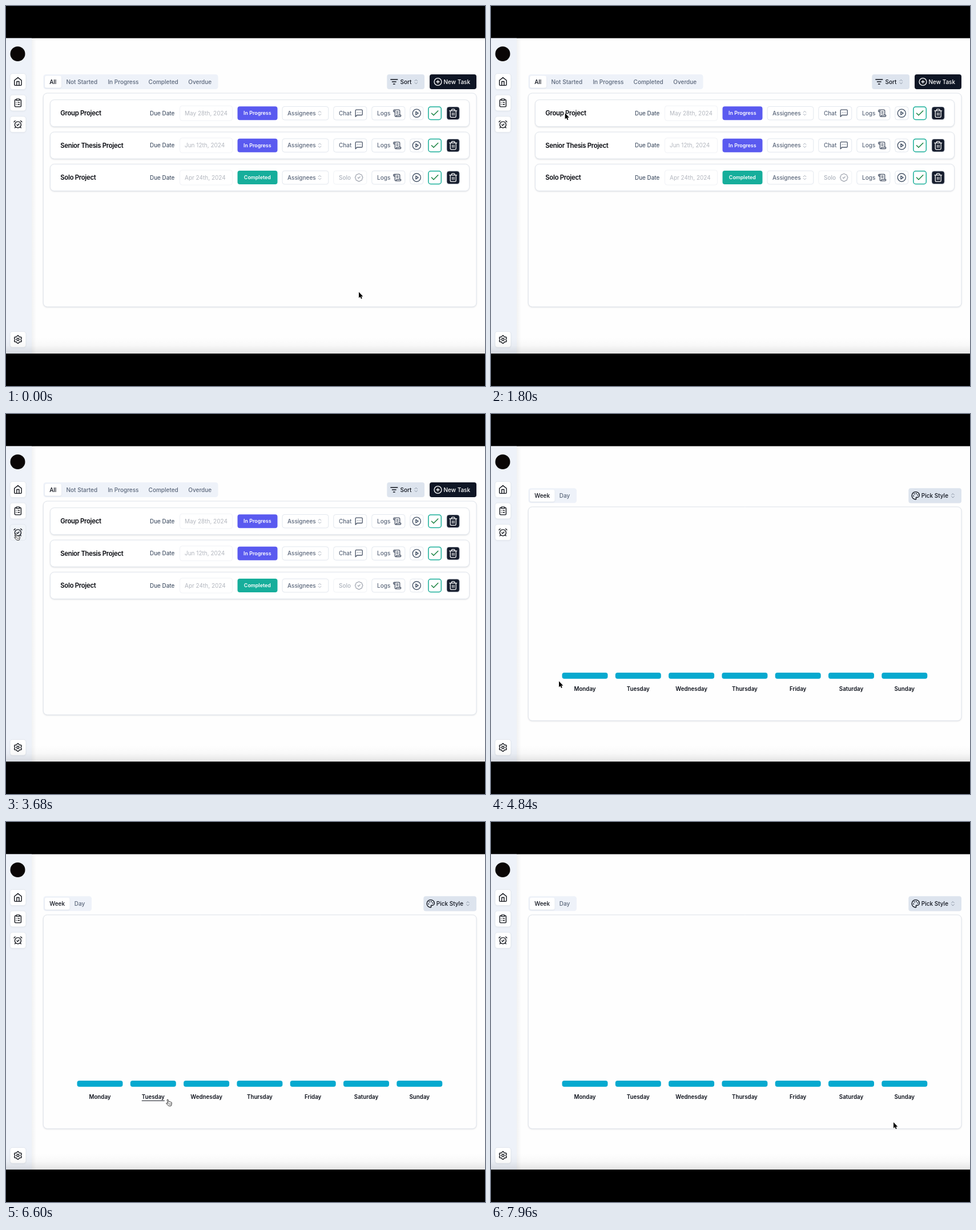
An HTML page with a canvas that plays this animation: 839x667 px, repeating every 8000 ms.

```html
<!DOCTYPE html>
<html lang="en">
<head>
<meta charset="utf-8">
<title>Task planner</title>
<style>
html, body { margin: 0; width: 100%; height: 100%; overflow: hidden; background: #000; }
canvas { display: block; width: 839px; height: 667px; }
</style>
</head>
<body>
<canvas id="stage"></canvas>
<script>
const W = 839, H = 667, LOOP = 8000, SWITCH = 3720;
const canvas = document.getElementById('stage');
const ratio = window.devicePixelRatio || 1;
canvas.width = W * ratio;
canvas.height = H * ratio;
const ctx = canvas.getContext('2d');

const INK = '#0b0f19', SLATE = '#5a667a', LINE = '#e2e7ee', TINT = '#eef2f9';

// Icons live on a 24 x 24 grid.
const dot = (x, y) => `M${x} ${y}h.01`;
const ring = (x, y, r) => `M${x - r} ${y}a${r} ${r} 0 1 0 ${2 * r} 0a${r} ${r} 0 1 0 ${-2 * r} 0`;

function gear() {
  let d = '';
  for (let i = 0; i < 120; i++) {
    const a = i / 120 * Math.PI * 2;
    const r = 8.8 + 1.25 * Math.tanh(2 * Math.cos(6 * a));
    d += `${i ? 'L' : 'M'}${12 + r * Math.sin(a)} ${12 - r * Math.cos(a)}`;
  }
  return d + 'z' + ring(12, 12, 3);
}

const shapes = {
  home: 'M3 9l9-7 9 7v11a2 2 0 0 1-2 2H5a2 2 0 0 1-2-2zM9 22V12h6v10',
  list: 'M9 2h6a1 1 0 0 1 1 1v2a1 1 0 0 1-1 1H9a1 1 0 0 1-1-1V3a1 1 0 0 1 1-1z' +
    'M16 4h2a2 2 0 0 1 2 2v14a2 2 0 0 1-2 2H6a2 2 0 0 1-2-2V6a2 2 0 0 1 2-2h2' +
    'M12 11h4M12 16h4' + dot(8, 11) + dot(8, 16),
  alarm: ring(12, 13, 8) + 'M5 3 2 6M22 6l-3-3M6.4 18.7 4 21M17.6 18.7 20 21M9 13l2 2 4-4',
  gear: gear(),
  filter: 'M3 6h18M7 12h10M10 18h4',
  plus: ring(12, 12, 10) + 'M8 12h8M12 8v8',
  chevrons: 'M7 15l5 5 5-5M7 9l5-5 5 5',
  chat: 'M21 15a2 2 0 0 1-2 2H7l-4 4V5a2 2 0 0 1 2-2h14a2 2 0 0 1 2 2z' +
    dot(8, 10) + dot(12, 10) + dot(16, 10),
  badge: 'M3.85 8.62a4 4 0 0 1 4.78-4.77 4 4 0 0 1 6.74 0 4 4 0 0 1 4.78 4.78 4 4 0 0 1 0 6.74' +
    ' 4 4 0 0 1-4.77 4.78 4 4 0 0 1-6.75 0 4 4 0 0 1-4.78-4.77 4 4 0 0 1 0-6.76zM9 12l2 2 4-4',
  scroll: 'M15 12h-5M15 8h-5M19 17V5a2 2 0 0 0-2-2H4M8 21h12a2 2 0 0 0 2-2v-1a1 1 0 0 0-1-1H11' +
    'a1 1 0 0 0-1 1v1a2 2 0 1 1-4 0V5a2 2 0 1 0-4 0v2a1 1 0 0 0 1 1h3',
  play: ring(12, 12, 10) + 'M10 8l6 4-6 4z',
  check: 'M20 6 9 17l-5-5',
  trash: 'M3 6h18M19 6v14a2 2 0 0 1-2 2H7a2 2 0 0 1-2-2V6M8 6V4a2 2 0 0 1 2-2h4a2 2 0 0 1 2 2v2' +
    'M10 11v6M14 11v6',
  palette: 'M12 2C6.5 2 2 6.5 2 12s4.5 10 10 10c.9 0 1.65-.75 1.65-1.7 0-.43-.18-.83-.44-1.12' +
    '-.29-.29-.44-.65-.44-1.12a1.64 1.64 0 0 1 1.67-1.67h2c3 0 5.55-2.5 5.55-5.55C22 6 17.5 2 12 2z' +
    ring(13.5, 6.5, .5) + ring(17.5, 10.5, .5) + ring(8.5, 7.5, .5) + ring(6.5, 12.5, .5)
};
const icons = Object.fromEntries(Object.entries(shapes).map(([k, d]) => [k, new Path2D(d)]));

const arrow = new Path2D('M0 0V10.4L2.4 8.3 4 12 5.7 11.3 4.2 7.7H7.3z');
const hand = new Path2D('M3.6 6.8L2 2Q1.7.6 2.8.5 3.6.4 4 1.6L5 4.6Q6.2 3.8 6.9 4.8 8 4.2 8.5 5.2' +
  ' 9.8 5 10 6.4 10.4 9 8.9 11.8H4.6Q3 9.6.8 8 0 7 1 6.6 2 6.4 3.6 7.6z');
const knuckles = new Path2D('M5.4 7.6v2M6.8 7.5v2M8.2 7.4v2');

function icon(name, cx, cy, size, color, weight = 2) {
  const s = size / 24;
  ctx.save();
  ctx.translate(cx - size / 2, cy - size / 2);
  ctx.scale(s, s);
  ctx.lineWidth = weight;
  ctx.lineCap = ctx.lineJoin = 'round';
  ctx.strokeStyle = color;
  ctx.stroke(icons[name]);
  ctx.restore();
}

// A box from its left, right, top and bottom edges.
function box(l, r, t, b, radius, fill, line, shadow = 0, weight = 1) {
  ctx.save();
  ctx.beginPath();
  ctx.roundRect(l, t, r - l, b - t, radius);
  if (shadow) {
    ctx.shadowColor = `rgba(15,23,42,${shadow})`;
    ctx.shadowBlur = 3 * ratio;
    ctx.shadowOffsetY = ratio;
  }
  ctx.fillStyle = fill;
  ctx.fill();
  ctx.shadowColor = 'transparent';
  if (line) {
    ctx.lineWidth = weight;
    ctx.strokeStyle = line;
    ctx.stroke();
  }
  ctx.restore();
}

// Text whose capitals are centred on cy.
function text(str, x, cy, { size = 10, weight = 500, color = SLATE, align = 'left', spacing = 0 } = {}) {
  ctx.font = `${weight} ${size}px Inter, sans-serif`;
  ctx.letterSpacing = spacing + 'px';
  ctx.textAlign = align;
  ctx.fillStyle = color;
  ctx.fillText(str, x, cy + size * .364);
}

function outlined(l, r, cy, half = 11.8) {
  box(l, r, cy - half, cy + half, 4, '#fff', LINE);
}

function tabs(cy, right, activeRight, labels) {
  box(65.5, right, cy - 13, cy + 13, 4.5, TINT);
  box(68, activeRight, cy - 10.5, cy + 10.5, 3.2, '#fff', null, .08);
  labels.forEach(([name, x], i) => text(name, x, cy, { color: i ? SLATE : INK }));
}

function panel(top, bottom) {
  box(65.3, 824, top, bottom, 7, '#fefefe', '#dfe4eb', .14);
}

function sidebar(hover) {
  ctx.fillStyle = TINT;
  ctx.fillRect(0, 56, 45, 554);
  const g = ctx.createLinearGradient(45, 0, 53, 0);
  g.addColorStop(0, 'rgba(15,23,42,.05)');
  g.addColorStop(1, 'rgba(15,23,42,0)');
  ctx.fillStyle = g;
  ctx.fillRect(45, 56, 8, 554);
  ctx.fillStyle = '#0a0606';
  ctx.beginPath();
  ctx.arc(20.5, 84, 13, 0, Math.PI * 2);
  ctx.fill();
  const items = [['home', 132.5], ['list', 170], ['alarm', 207.7], ['gear', 585.3]];
  for (const [name, cy] of items) {
    const lit = hover && name === 'alarm';
    box(7, 35, cy - 14, cy + 14, 4.5, lit ? '#f0f4f9' : '#fff', LINE, lit ? 0 : .06);
    icon(name, 20.9, cy, 16.5, '#0d1017');
  }
}

function row(cy, title, date, done) {
  box(77.5, 811.5, cy - 23.5, cy + 23.5, 7, '#fff', '#e0e5ec', .16);
  text(title, 95.3, cy, { size: 11.3, weight: 600, color: '#05070d', spacing: -.28 });
  text('Due Date', 252, cy, { color: '#475569', size: 9.9 });
  box(304.5, 396.5, cy - 13, cy + 13, 4, '#fff', '#f0f2f6');
  text(date, 313, cy, { weight: 400, color: '#b3b7bf' });
  box(405.5, 475.5, cy - 12, cy + 12, 4, done ? '#16ae9b' : '#5a5af0');
  text(done ? 'Completed' : 'In Progress', 440.3, cy,
    { size: 8.9, weight: 600, color: '#fff', align: 'center' });

  outlined(484, 564.8, cy);
  text('Assignees', 493, cy);
  icon('chevrons', 549.5, cy, 11, '#9aa3b1');

  ctx.globalAlpha = done ? .5 : 1;
  outlined(573.8, 631.8, cy);
  text(done ? 'Solo' : 'Chat', 583, cy);
  icon(done ? 'badge' : 'chat', 618.2, cy, 16, '#4b5669');
  ctx.globalAlpha = 1;

  outlined(640.8, 698.8, cy);
  text('Logs', 650, cy);
  icon('scroll', 685.2, cy, 15.5, '#465165');
  outlined(707.8, 730.8, cy, 11.5);
  icon('play', 719.3, cy, 17, '#475569');
  box(739.9, 762.3, cy - 11.3, cy + 11.3, 4, '#fff', '#18ae99', 0, 1.5);
  icon('check', 751.1, cy, 17, '#15803d');
  box(772, 794.3, cy - 11.3, cy + 11.3, 4, '#161d2d', '#dbe1ea', 0, .7);
  icon('trash', 783.2, cy, 17, '#fff', 1.8);
}

function taskPage() {
  tabs(133, 371.5, 97, [['All', 76.2], ['Not Started', 105.5], ['In Progress', 178.4],
    ['Completed', 249.6], ['Overdue', 319.3]]);
  box(667.3, 733, 120, 146, 4, '#dde4ee');
  icon('filter', 679.8, 133, 16, INK);
  text('Sort', 690.5, 133, { color: INK });
  icon('chevrons', 718.2, 133, 11, '#7f8a9b');
  box(742, 824, 120, 146, 4, '#0f1625');
  icon('plus', 756.5, 133, 15.5, '#fff');
  text('New Task', 766.4, 133, { color: '#fff' });
  panel(153, 528);
  row(188.2, 'Group Project', 'May 28th, 2024');
  row(244.7, 'Senior Thesis Project', 'Jun 12th, 2024');
  row(301.1, 'Solo Project', 'Apr 24th, 2024', true);
}

const DAYS = ['Monday', 'Tuesday', 'Wednesday', 'Thursday', 'Friday', 'Saturday', 'Sunday'];
const dayX = i => 164.5 + 93.3 * i;

function weekPage(hovered) {
  tabs(143.3, 150, 111.5, [['Week', 76.2], ['Day', 119.7]]);
  box(731.3, 824, 130.3, 156.5, 4, '#dde4ee');
  icon('palette', 743.8, 143.3, 16, INK);
  text('Pick Style', 753.8, 143.3, { color: INK });
  icon('chevrons', 809, 143.3, 11, '#7f8a9b');
  panel(163, 538.3);
  DAYS.forEach((name, i) => {
    const x = dayX(i);
    box(x - 40, x + 40, 454, 464.8, 4, '#06a9cf');
    text(name, x, 482.6, { size: 9.75, weight: 600, color: INK, align: 'center' });
    if (i === hovered) {
      const w = ctx.measureText(name).width;
      ctx.fillRect(x - w / 2, 488.7, w, 1);
    }
  });
}

const clamp = v => Math.min(1, Math.max(0, v));
const easeOut = p => 1 - (1 - p) ** 2;

// Pop-up above a day: fades, zooms and slides in, then fades and zooms out.
function popup(cx, t, open, close) {
  const enter = easeOut(clamp((t - open) / 150));
  const leave = easeOut(clamp((t - close) / 150));
  const shown = enter * (1 - leave);
  if (!shown) return;
  const scale = .95 + .05 * shown;
  ctx.save();
  ctx.globalAlpha = shown;
  ctx.translate(cx, 428.5 + 5 * (1 - enter));
  ctx.scale(scale, scale);
  box(-81, 81, -36, 35.5, 4.5, '#fff', LINE, .14);
  text('No Progress Recorded', 0, 0, { size: 11.1, weight: 400, color: '#1c2230', align: 'center' });
  ctx.restore();
}

// Pointer stops: time, x, y.
const route = [
  [0, 618, 502], [60, 618, 502], [240, 614, 428], [780, 614, 428], [1200, 600, 386],
  [1420, 600, 386], [1800, 130, 188], [2240, 38, 196], [2560, 17, 211], [2690, 17, 211],
  [2720, 17, 210], [3940, 17, 210], [4520, 117, 467], [4700, 117, 467], [4840, 119, 469],
  [5060, 127, 491], [5240, 150, 488], [5990, 150, 488], [6340, 283, 487], [7260, 283, 487],
  [7590, 470, 544], [7960, 705, 527], [8000, 705, 527]
];

function slope(i, k) {
  if (i < 1 || i > route.length - 2) return 0;
  const [p, c, n] = [route[i - 1], route[i], route[i + 1]];
  const a = (c[k] - p[k]) / (c[0] - p[0]), b = (n[k] - c[k]) / (n[0] - c[0]);
  return a * b > 0 ? 2 * a * b / (a + b) : 0;
}

function pointerAt(t) {
  let i = 0;
  while (i < route.length - 2 && route[i + 1][0] <= t) i++;
  const a = route[i], b = route[i + 1], d = b[0] - a[0], u = (t - a[0]) / d;
  return [1, 2].map(k => {
    const h = u * u * (3 - 2 * u);
    return a[k] + (b[k] - a[k]) * h +
      d * u * (1 - u) * (slope(i, k) * (1 - u) - slope(i + 1, k) * u);
  });
}

function drawPointer(x, y, link) {
  ctx.save();
  ctx.lineJoin = 'round';
  if (link) {
    ctx.translate(x - 2.8, y - .5);
    ctx.fillStyle = '#fff';
    ctx.strokeStyle = '#111';
    ctx.lineWidth = .9;
    ctx.fill(hand);
    ctx.stroke(hand);
    ctx.lineWidth = .6;
    ctx.stroke(knuckles);
  } else {
    ctx.translate(x, y);
    ctx.strokeStyle = '#fff';
    ctx.lineWidth = 1.4;
    ctx.stroke(arrow);
    ctx.fillStyle = '#000';
    ctx.fill(arrow);
  }
  ctx.restore();
}

function draw(t) {
  const [x, y] = pointerAt(t);
  const week = t >= SWITCH;
  const onAlarm = x < 35 && y > 194 && y < 222;
  const day = week && y > 472 && y < 496 ? DAYS.findIndex((_, i) => Math.abs(x - dayX(i)) < 40) : -1;

  ctx.setTransform(ratio, 0, 0, ratio, 0, 0);
  ctx.fillStyle = '#000';
  ctx.fillRect(0, 0, W, H);
  ctx.fillStyle = '#fefefe';
  ctx.fillRect(0, 56.3, W, 554);
  sidebar(onAlarm);
  if (week) {
    weekPage(day);
    popup(dayX(0), t, 5745, 6440);
    popup(dayX(1), t, 6865, 7590);
  } else {
    taskPage();
  }

  const shade = ctx.createLinearGradient(0, 582, 0, 610);
  shade.addColorStop(0, 'rgba(0,0,0,0)');
  shade.addColorStop(.5, 'rgba(0,0,0,.025)');
  shade.addColorStop(1, 'rgba(0,0,0,.1)');
  ctx.fillStyle = shade;
  ctx.fillRect(0, 582, W, 28.3);
  ctx.fillStyle = '#000';
  ctx.fillRect(0, 0, W, 56.3);
  ctx.fillRect(0, 610.3, W, 57);
  drawPointer(x, y, onAlarm || day >= 0);
}

const start = performance.now();
function tick() {
  draw((performance.now() - start) % LOOP);
  requestAnimationFrame(tick);
}
tick();
</script>
</body>
</html>
```
